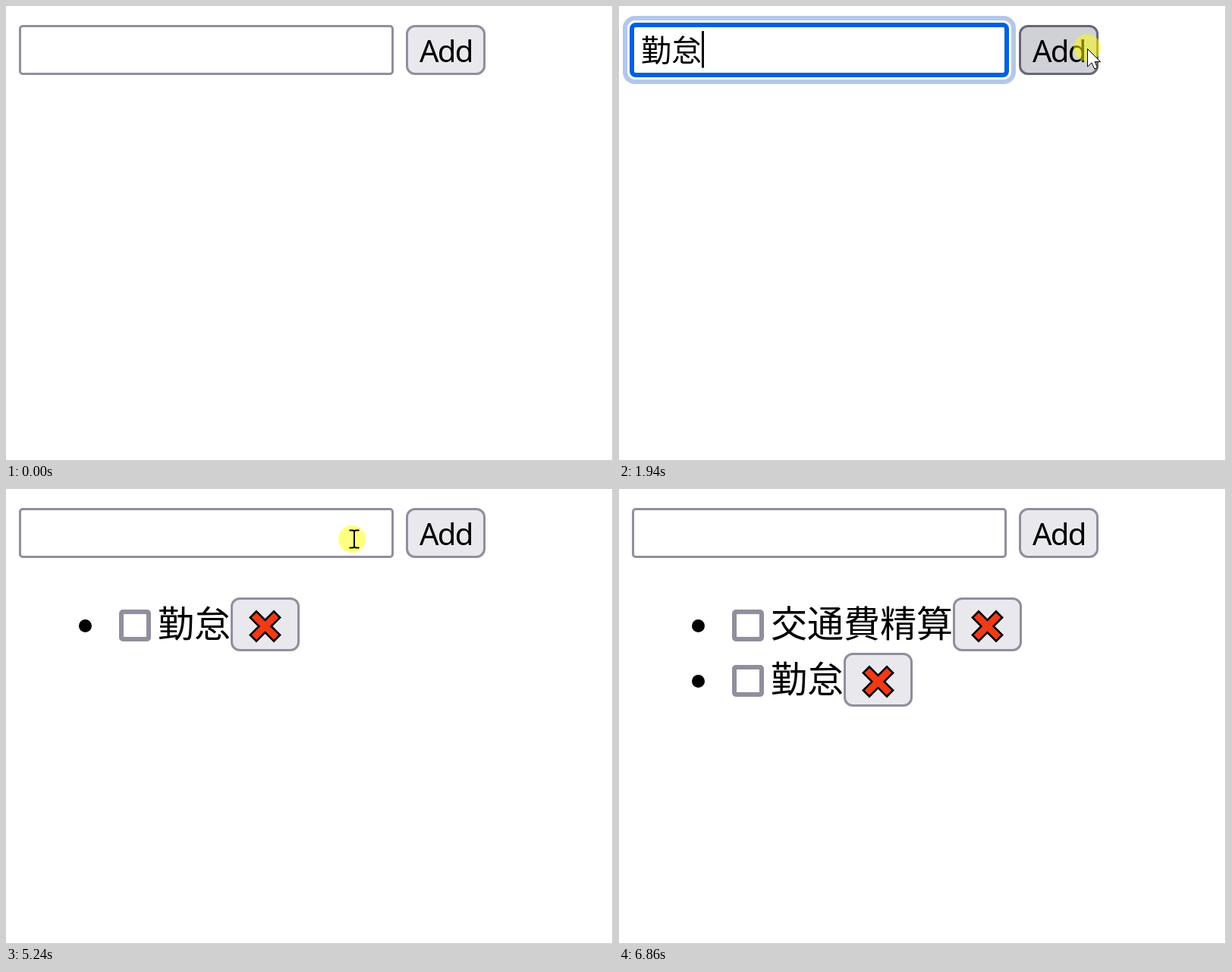
These frames come from a looping animation (800 by 600 pixels, 8 s). An HTML page:

```html
<!DOCTYPE html>
<html lang="ja">
<head>
<meta charset="utf-8">
<title>Todo list</title>
<style>
  html, body { margin: 0; width: 100%; height: 100%; overflow: hidden; background: #fff; }
  svg { display: block; width: 800px; height: 600px; }
  text { font-family: "Noto Sans CJK JP", "Noto Sans CJK", sans-serif; white-space: pre; }
  .latin { font-family: "Noto Sans", "Open Sans", sans-serif; }
</style>
</head>
<body>
<svg id="stage" viewBox="0 0 800 600"></svg>
<script>
const LOOP = 8000;
const GREY = '#8f8f9d', FACE = '#e9e9ed';
const FIRST = '勤怠', SECOND = '交通費精算';
const OPTIONS = ['AAAAAA', 'AAAAAAA', 'AAAAA', 'AAAA', SECOND, 'ほげほげ'];
const stage = document.getElementById('stage');

// Box given by its outer edges, with the border drawn inside them.
function box(x, y, w, h, r, fill, stroke, line) {
  return `<rect x="${x + line / 2}" y="${y + line / 2}" width="${w - line}" height="${h - line}" ` +
    `rx="${r}" fill="${fill}" stroke="${stroke}" stroke-width="${line}"/>`;
}

function label(str, x, y, size, spacing = 0) {
  const cls = /^[A-Za-z]/.test(str) ? ' class="latin"' : '';
  return `<text${cls} x="${x}" y="${y}" font-size="${size}" letter-spacing="${spacing}">${str}</text>`;
}

function field({ focus, text }) {
  if (!focus) return box(17, 25, 494, 66, 3.5, '#fff', GREY, 3);
  const caret = 29 + 40 * text.length;
  return box(5, 13, 518, 90, 13, '#fff', '#b3c7ea', 6) +
    box(14, 22, 500, 72, 5, '#fff', '#0060df', 6) +
    label(text, 29, 73, 40) +
    `<rect x="${caret}" y="33" width="3" height="48.5"/>`;
}

function addButton(hover) {
  return box(527, 25, 105, 66, 10.5, hover ? '#d0d0d7' : FACE, hover ? '#676774' : GREY, 3) +
    label('Add', 545, 74, 40, -1.7);
}

function popup(rows) {
  if (!rows.length) return '';
  const h = rows.length * 30 + 2;
  let out = `<path d="M16.5 92V${88 + h}q0 4 4 4H505.5q4 0 4-4V92z" fill="#fff" stroke="#9a9a9a" ` +
    `style="filter:drop-shadow(0 1px 2px rgba(0,0,0,.2))"/><path d="M17 92H509" stroke="#fff"/>`;
  rows.forEach((row, i) => {
    const kana = row[0] === 'ほ';
    out += label(row, 25, (kana ? 113.5 : 114) + 30 * i, kana ? 17 : 18, kana ? -2 : 0);
  });
  if (rows.length > 1) {
    out += '<path d="M483 93H509V270q0 4-4 4H483z" fill="#f0f0f0"/>' +
      '<rect x="483" y="118" width="26" height="42" fill="#cdcdcd"/>' +
      '<path d="M490.5 107l5.5-5.5 5.5 5.5M490.5 258.500l5.500 5.500 5.500-5.500" ' +
      'fill="none" stroke="#606358" stroke-width="3.2"/>';
  }
  return out;
}

function item(str, row) {
  const x = 200 + 48 * str.length;
  return `<g transform="translate(0 ${73 * row})"><circle cx="104.500" cy="180.500" r="8.500"/>` +
    box(149, 159, 42, 42, 2, '#fff', GREY, 6) + label(str, 200, 195, 48) +
    box(x, 143, 91, 71, 10.5, FACE, GREY, 3) +
    `<g transform="translate(${x + 45.5} 181)">` +
    '<path d="M-16.500-16.500L16.500 16.500M16.500-16.500L-16.500 16.500" stroke="#000" stroke-width="14"/>' +
    '<path d="M-14.600-14.600L14.600 14.600M14.600-14.600L-14.600 14.600" stroke="#f03a17" stroke-width="9"/></g></g>';
}

const inside = ([x, y], l, r) => x > l && x < r && y > 25 && y < 91;

function pointer(pos, glow) {
  if (!pos) return '';
  const [x, y] = pos;
  const beam = inside(pos, 17, 511);
  const shape = beam
    ? '<path d="M-6.500-11.500H-2.500Q0-11.500 0-9.500Q0-11.500 2.500-11.500H6.500M0-10V10' +
      'M-6.500 11.500H-2.500Q0 11.500 0 9.500Q0 11.500 2.500 11.500H6.500" fill="none" stroke="#000" stroke-width="2"/>'
    : '<path d="M.5.5V24L6 18.800L9.700 27L13.500 25.300L10 17.500H17.500z" fill="#fff" stroke="#000"/>';
  const halo = glow
    ? `<circle cx="${x - (beam ? 3 : 0)}" cy="${y - (beam ? 0 : 1)}" r="18" fill="#ff0" opacity="${glow}"/>` : '';
  return halo + `<g transform="translate(${x} ${y})">${shape}</g>`;
}

// Index of the step reached in a run of n steps from a to b; -1 before it starts.
function step(t, a, b, n) {
  return t < a ? -1 : Math.min(n - 1, Math.floor((t - a) * (n - 1) / (b - a) + 1e-6));
}

function glide(from, to, k, n) {
  const u = Math.max(0, Math.min(1, k / n));
  const e = u * u * (3 - 2 * u);
  return from.map((v, i) => Math.round(v + (to[i] - v) * e));
}

function stateAt(t) {
  const s = { focus: false, text: '', rows: [], items: [], pos: null, glow: 0 };
  const enter = step(t, 130, 840, 10), type = step(t, 1230, 1640, 6);
  const press = step(t, 1870, 2010, 3), leave = step(t, 2340, 2410, 2);
  const back = step(t, 4800, 5310, 7), fill = step(t, 5770, 6080, 5);
  const again = step(t, 6410, 6860, 7);

  if (again >= 0) {
    s.focus = again < 2;
    s.text = SECOND;
    s.rows = again < 1 ? [SECOND] : [];
    s.items = again < 2 ? [FIRST] : [SECOND, FIRST];
    s.glow = again < 2 ? 0.5 : 0;
    s.pos = again < 6 ? glide([602, 59], [575, 250], again - 2, 3) : null;
  } else if (back >= 0) {
    s.items = [FIRST];
    s.focus = back > 5;
    s.glow = back === 5 ? 0.5 : 0;
    s.pos = glide([550, 95], [459, 66], back, 4);
    if (fill >= 0) {
      s.text = SECOND;
      s.rows = [SECOND];
      s.pos = glide([459, 66], [602, 59], fill, 4);
    }
  } else if (press > 1) {
    s.items = [FIRST];
    s.pos = [[617, 56], [734, 137], null][leave + 1];
  } else if (type >= 0) {
    s.focus = true;
    s.text = FIRST;
    s.pos = glide([360, 57], [617, 56], type, 5);
    s.glow = press < 0 ? 0 : press ? 0.5 : 0.35;
  } else if (enter >= 0) {
    s.focus = enter > 7;
    s.rows = enter > 8 ? OPTIONS : [];
    s.glow = enter === 7 || enter === 8 ? 0.5 : 0;
    s.pos = glide([601, 476], [360, 57], enter, 6);
  }
  return s;
}

let last = '';
function draw(t) {
  const s = stateAt(t);
  const art = '<rect width="800" height="600" fill="#fff"/>' +
    '<path d="M799.500 0V599.500H0" fill="none" stroke="#c8c8c8"/>' +
    field(s) + addButton(s.pos && inside(s.pos, 527, 632)) +
    s.items.map(item).join('') + popup(s.rows) + pointer(s.pos, s.glow);
  if (art !== last) stage.innerHTML = last = art;
}

const start = performance.now();
function tick() {
  draw((performance.now() - start) % LOOP);
  requestAnimationFrame(tick);
}
tick();
</script>
</body>
</html>
```
